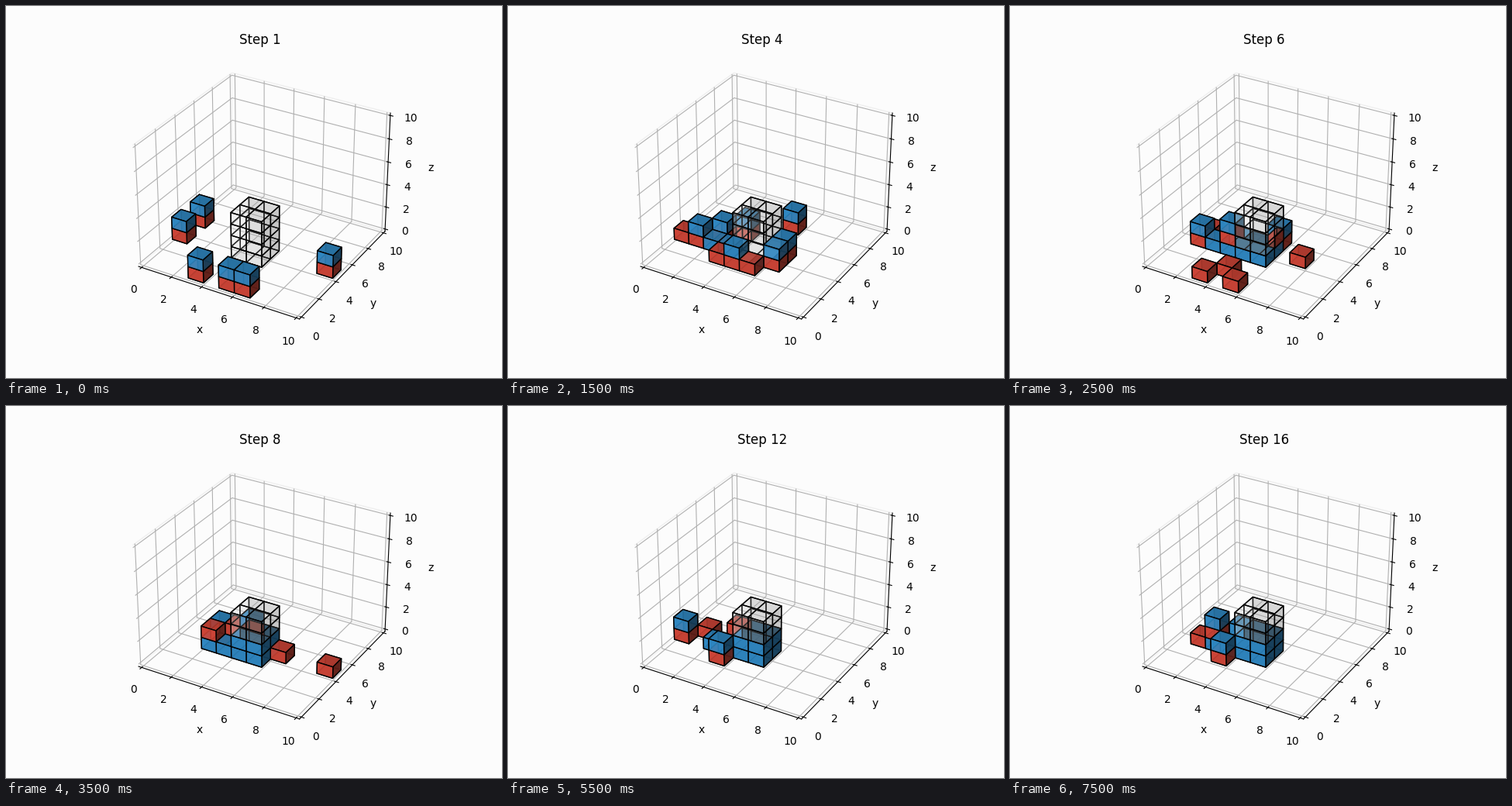
Animation, 640 px wide and 480 px high, one loop 8000 ms. Source, as a matplotlib script:

```python
import numpy as np
import matplotlib.pyplot as plt
from matplotlib.animation import FuncAnimation
from matplotlib.colors import to_rgba

SIZE, STEPS = 10, 16
PAPER = "#fcfcfc"
GHOST = to_rgba("white", 0.2)
ROBOT = to_rgba("#e74c3c", 0.9)
BLOCK = to_rgba("#3498db", 0.9)

DIRS = {"e": (1, 0, 0), "w": (-1, 0, 0), "n": (0, 1, 0), "s": (0, -1, 0),
        "u": (0, 0, 1), "d": (0, 0, -1), ".": (0, 0, 0)}

# first step, start cell, one move per step, step at which the load is gone
ROBOTS = [
    (1, (0, 3, 0), "e . w", 3),
    (1, (0, 5, 0), "e s e . w w", 5),
    (1, (3, 0, 0), "n n . s s", 4),
    (1, (5, 0, 0), "n n . s s", 4),
    (1, (6, 0, 0), "n n n wu n . ed e e e", 6),
    (1, (9, 4, 0), "w w w . e e e", 5),
    (2, (0, 2, 0), "n e eu e . w wd w", 7),
    (2, (4, 0, 0), "n n . s s", 5),
    (2, (3, 7, 0), "s s .", 5),
    (2, (5, 9, 0), "s s s s .", 7),
    (5, (0, 3, 0), "e n e su e wnd w w", 11),
    (7, (4, 4, 1), ".", 9),
    (7, (3, 4, 1), ". . . . . . .", 7),
    (9, (1, 4, 0), "wn", 9),
    (10, (3, 0, 0), "n n", 99),
    (12, (0, 3, 0), "e . . eu", 99),
    (14, (3, 0, 0), "n n", 99),
    (15, (0, 4, 0), "es", 15),
]

# cells of laid blocks, keyed by the step at which they appear
LAID = {
    3: [(2, 3, 0)],
    4: [(3, 3, 0), (5, 3, 0)],
    5: [(4, 3, 0), (4, 4, 0), (5, 4, 0), (3, 4, 0)],
    7: [(5, 3, 1), (4, 3, 1)],
    8: [(5, 4, 1)],
    9: [(4, 4, 1)],
    15: [(3, 4, 1)],
}


def locate(start, moves):
    """Cell reached after a list of moves."""
    return np.array(start) + sum(np.array(DIRS[c]) for m in moves for c in m)


def build(step):
    """Filled cells and their colours at one step."""
    filled = np.zeros((SIZE,) * 3, bool)
    colors = np.zeros((SIZE,) * 3 + (4,))

    def put(cell, color):
        filled[cell] = True
        colors[cell] = color

    put(np.s_[4:6, 3:5, 0:4], GHOST)
    for first, cells in LAID.items():
        if first <= step:
            for cell in cells:
                put(cell, BLOCK)
    for first, start, route, drop in ROBOTS:
        moves = route.split()
        if first <= step <= first + len(moves):
            x, y, z = locate(start, moves[:step - first])
            put((x, y, z), ROBOT)
            if step < drop:
                put((x, y, z + 1), BLOCK)
    return filled, colors


fig = plt.figure(figsize=(6.4, 4.8), dpi=100, facecolor=PAPER)
ax = fig.add_subplot(projection="3d", facecolor=PAPER)
margin = SIZE / 48
span = (-margin, SIZE + margin)
ax.set(xlim=span, ylim=span, zlim=span, xlabel="x", ylabel="y", zlabel="z")
for axis in (ax.xaxis, ax.yaxis, ax.zaxis):
    axis.set_pane_color(PAPER)
    axis.pane.set_edgecolor("#efefef")

shown = []


def update(frame):
    while shown:
        shown.pop().remove()
    filled, colors = build(frame + 1)
    shown.extend(ax.voxels(filled, facecolors=colors, edgecolors="k").values())
    ax.set_title(f"Step {frame + 1}")
    return shown


anim = FuncAnimation(fig, update, frames=STEPS, interval=500,
                     init_func=lambda: [], blit=False)
plt.show()
```
